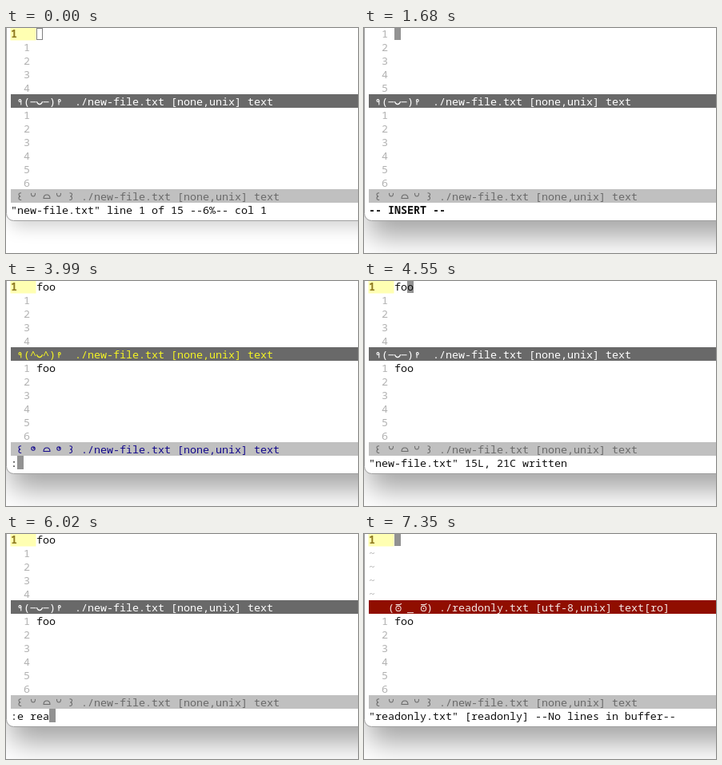
An HTML page for the animation above (8000 ms loop, 440 by 282 pixels).

```html
<!DOCTYPE html>
<html lang="en">
<head>
<meta charset="utf-8">
<title>Status line moods</title>
<style>
  html, body { margin: 0; width: 100%; height: 100%; overflow: hidden; background: #fff; }
  svg { display: block; width: 440px; height: 282px; }
  text { font: 500 13.333px "Noto Sans Mono", "DejaVu Sans Mono", monospace; white-space: pre; font-variant-ligatures: none; }
  .bold { font-weight: 700; }
  .face { fill: none; stroke: currentColor; stroke-width: 1.05; stroke-linecap: round; }
  .face text, .face .dot { fill: currentColor; stroke: none; }
</style>
</head>
<body>
<svg viewBox="0 0 440 282">
  <defs>
    <filter id="soft" x="-20%" y="-40%" width="140%" height="180%"><feGaussianBlur stdDeviation="17"/></filter>
    <filter id="faint" x="-20%" y="-40%" width="140%" height="180%"><feGaussianBlur stdDeviation="10"/></filter>
  </defs>
  <rect width="440" height="282" fill="#fff"/>
  <rect id="shadow" x="6" width="540" height="300" rx="10"/>
  <rect x="0.5" y="-19.5" width="480" height="261" rx="9" fill="#fff" stroke="#a0a0a0"/>
  <g id="screen"></g>
</svg>
<script>
const LOOP = 8000, CELL = 8, LINE = 17;
const GREY = '#b2b2b2', BLACK = '#111', CURSOR = '#929292';
const shadow = document.getElementById('shadow');
const screen = document.getElementById('screen');

const colX = c => 6 + c * CELL;
const rowY = r => r * LINE - 2;

// Each entry holds from its time until the next one.
const focus = 980, shade = 910, insert = 1680, escape = 3640, write = 4340, open = 7280;
const typed = [[2030, 'f'], [2170, 'fo'], [2310, 'foo']];
const commands = [
  [0, '"new-file.txt" line 1 of 15 --6%-- col 1'],
  [insert, '-- INSERT --'],
  [escape, ''],
  [3920, ':'], [4130, ':w'],
  [write, '"new-file.txt" 15L, 21C written'],
  [5320, ':'], [5460, ':e'], [5670, ':e '], [5880, ':e r'],
  [6020, ':e rea'], [6230, ':e read'], [6510, ':e readonly.txt'],
  [open, '"readonly.txt" [readonly] --No lines in buffer--']
];

const at = (steps, t) => steps.reduce((v, [from, s]) => t >= from ? s : v, '');

function put(row, col, str, fill, cls = '') {
  return `<text x="${colX(col)}" y="${rowY(row) + 14}" fill="${fill}" class="${cls}">${str}</text>`;
}

function bar(row, fill) {
  return `<rect x="6" y="${rowY(row)}" width="434" height="${LINE}" fill="${fill}"/>`;
}

function cursor(row, col, filled) {
  const x = colX(col), y = Math.max(0, rowY(row)), h = rowY(row + 1) - y;
  return filled
    ? `<rect x="${x}" y="${y}" width="${CELL}" height="${h}" fill="${CURSOR}"/>`
    : `<rect x="${x + .5}" y="${y + .5}" width="7" height="${h - 1}" fill="none" stroke="#808080"/>`;
}

const face = (row, color, body) =>
  `<g class="face" style="color:${color}" transform="translate(0 ${rowY(row)})">${body}</g>`;
const glyph = (col, ch) => `<text x="${colX(col)}" y="14">${ch}</text>`;
const path = d => `<path d="${d}"/>`;

function armsFace(color, awake) {
  const eye = col => awake ? glyph(col, '^') : path(`M${colX(col) + .8} 9.7h6.4`);
  return face(5, color,
    '<circle cx="17.4" cy="8" r="1.4"/>' + path('M18.8 8V13') +
    glyph(2, '(') + eye(3) + path('M38.6 9.5Q39.5 12.6 42 12.6Q44.5 12.6 45.4 9.5') + eye(5) + glyph(6, ')') +
    '<circle cx="66.8" cy="8" r="1.4"/>' + path('M66 9.5V13'));
}

function curlyFace(color, awake) {
  const curl = 'M18.6 4.8Q15.6 4.8 16 6.9Q16.2 8.8 18.2 9Q15.9 9.2 16 11.2Q16 13.6 18.8 13.4';
  const eye = x => awake
    ? `<circle cx="${x}" cy="8" r="2.2"/><circle class="dot" cx="${x + .8}" cy="7.3" r="1.1"/>`
    : path(`M${x - 2.5} 5.3Q${x - 2.5} 9 ${x} 9Q${x + 2.5} 9 ${x + 2.5} 5.3`);
  return face(12, color,
    path(curl) + eye(34) + path('M47 11.5Q47.2 7 51 7Q54.8 7 55 11.5Z') + eye(66) +
    `<g transform="translate(98.5 0) scale(-1 1)">${path(curl)}</g>`);
}

function sternFace(color) {
  const eye = x => `<circle cx="${x}" cy="10.4" r="3.1"/><circle class="dot" cx="${x}" cy="10.4" r=".8"/>` +
    path(`M${x - 3} 5.6H${x + 1.2}Q${x + 2.6} 5.6 ${x + 3.6} 4.4`);
  return face(5, color, glyph(3, '(') + eye(43) + glyph(6, '_') + eye(74.5) + glyph(9, ')'));
}

function draw(t) {
  const readonly = t >= open;
  const inserting = t >= insert && t < escape;
  const awake = t >= typed[0][0] && t < write;
  const text = at(typed, t), cmd = at(commands, t);
  const onCmd = cmd[0] === ':';
  let out = '';

  // Upper window
  if (!inserting) out += `<rect x="5.5" y="0" width="32" height="15.5" fill="#ffffb2"/>` + put(0, 0, '1', '#8f7a20', 'bold');
  if (onCmd) out += cursor(13, cmd.length, true);
  else {
    const col = readonly ? 0 : inserting ? text.length : Math.max(0, text.length - 1);
    out += cursor(0, 4 + col, t >= focus);
  }
  for (let r = inserting ? 0 : 1; r < 5; r++)
    out += readonly ? put(r, 0, '~', GREY) : put(r, 2, inserting ? r + 1 : r, GREY);
  if (!readonly) out += put(0, 4, text, BLACK);

  // Upper status line
  if (readonly) {
    out += bar(5, '#900e00') + sternFace('#f4e6e2') +
      put(5, 11, './readonly.txt [utf-8,unix] text[ro]', '#f4e6e2');
  } else {
    const ink = awake ? '#f4f424' : '#fff';
    out += bar(5, '#696969') + armsFace(ink, awake) + put(5, 10, './new-file.txt [none,unix] text', ink);
  }

  // Lower window
  for (let n = 1; n <= 6; n++) out += put(5 + n, 2, n, GREY);
  out += put(6, 4, text, BLACK);
  const ink = awake ? '#140a8c' : '#6a6a6a';
  out += bar(12, '#c0c0c0') + curlyFace(ink, awake) + put(12, 11, './new-file.txt [none,unix] text', ink);

  return out + put(13, 0, cmd, BLACK, inserting ? 'bold' : '');
}

function castShadow(active) {
  shadow.setAttribute('y', active ? -38 : -50);
  shadow.setAttribute('filter', active ? 'url(#soft)' : 'url(#faint)');
  shadow.setAttribute('fill-opacity', active ? .35 : .17);
}

let last = '', lit = null;
function update(t) {
  const markup = draw(t), active = t >= shade;
  if (markup !== last) screen.innerHTML = last = markup;
  if (active !== lit) castShadow(lit = active);
}

const start = performance.now();
function tick() {
  update((performance.now() - start) % LOOP);
  requestAnimationFrame(tick);
}
tick();
</script>
</body>
</html>
```
